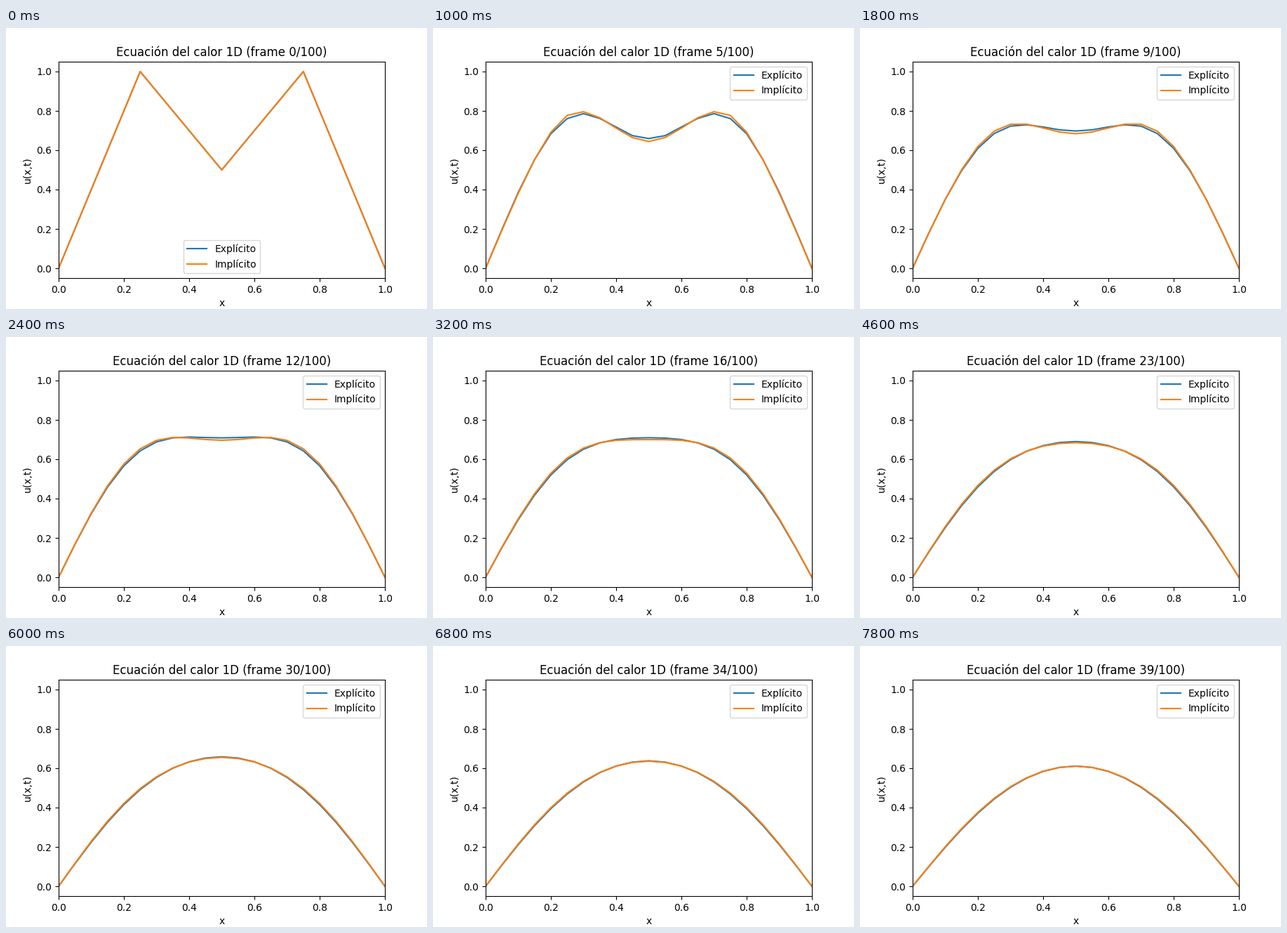
Recreate the animation shown at these times as a matplotlib script. Size 600 by 400 pixels, loop 8 s.

```python
import numpy as np
import matplotlib.pyplot as plt
from matplotlib.animation import FuncAnimation

FRAMES = 40
TOTAL_STEPS = 100
NX = 21
DT = 0.001

x = np.linspace(0, 1, NX)
r = DT / (x[1] - x[0]) ** 2


def laplacian(n):
    """Second-difference matrix; zero end rows keep the boundary fixed."""
    m = -2 * np.eye(n) + np.eye(n, k=1) + np.eye(n, k=-1)
    m[0] = m[-1] = 0
    return m


def evolve(step, u0, n):
    """Return the solution at every step, starting from u0."""
    states = [u0]
    for _ in range(n - 1):
        states.append(step @ states[-1])
    return states


u0 = np.interp(x, [0, 0.25, 0.5, 0.75, 1], [0, 1, 0.5, 1, 0])
L = laplacian(NX)
explicit = evolve(np.eye(NX) + r * L, u0, FRAMES)
implicit = evolve(np.linalg.inv(np.eye(NX) - r * L), u0, FRAMES)

fig, ax = plt.subplots(figsize=(6, 4), dpi=100)
line_exp, = ax.plot(x, u0, label="Explícito")
line_imp, = ax.plot(x, u0, label="Implícito")
ax.set_xlim(0, 1)
ax.set_ylim(-0.05, 1.05)
ax.set_xlabel("x")
ax.set_ylabel("u(x,t)")
ax.legend(loc="best")


def update(n):
    line_exp.set_ydata(explicit[n])
    line_imp.set_ydata(implicit[n])
    ax.set_title(f"Ecuación del calor 1D (frame {n}/{TOTAL_STEPS})")
    return line_exp, line_imp


anim = FuncAnimation(fig, update, frames=FRAMES, interval=200,
                     repeat=True, repeat_delay=0, blit=False)
plt.show()
```
